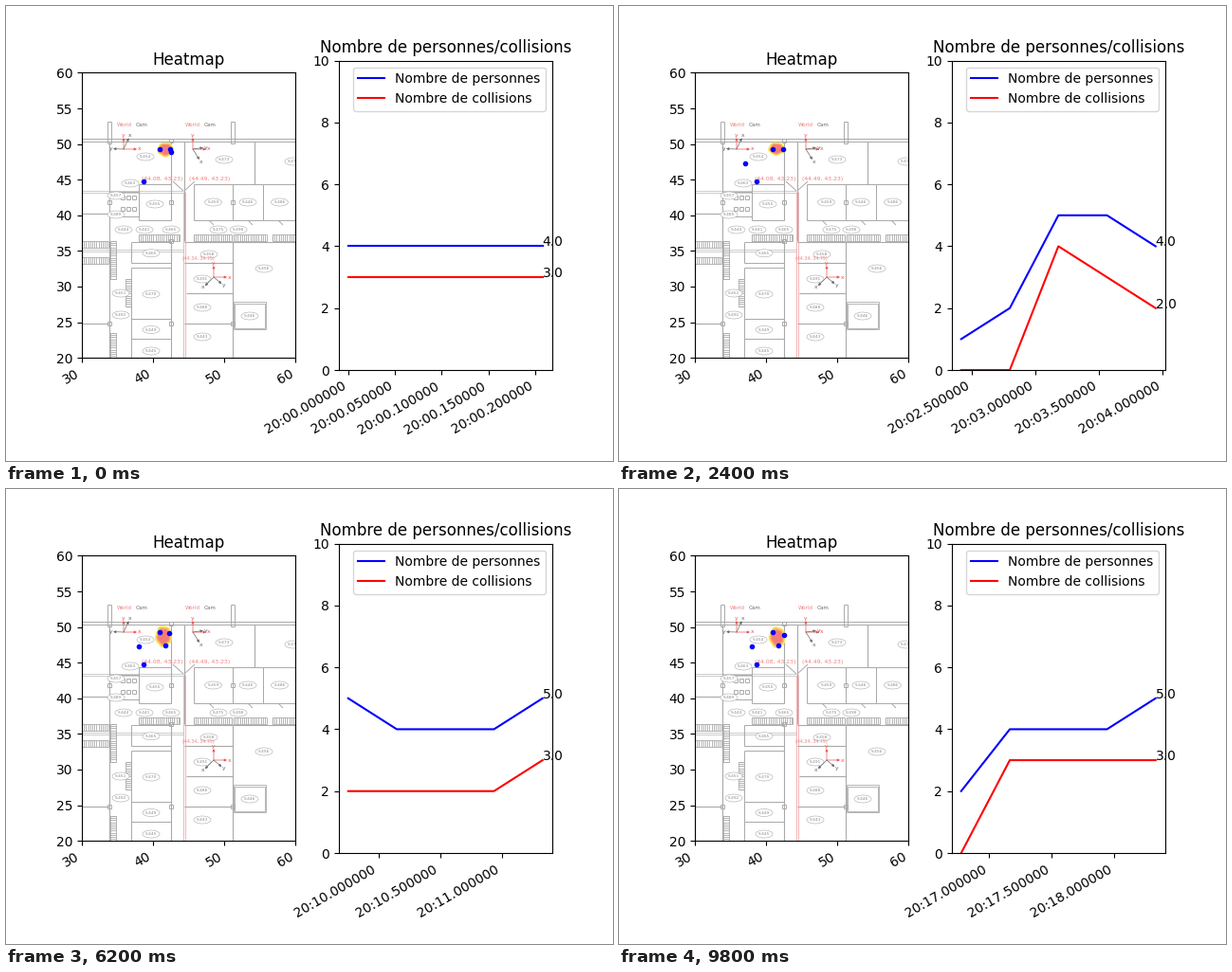
These frames come from a looping animation (640x480 px, 10000 ms). A matplotlib script:

```python
import random

import numpy as np
import matplotlib.pyplot as plt
from matplotlib.animation import FuncAnimation
from matplotlib.collections import LineCollection
from matplotlib.patches import Ellipse, Polygon

FRAMES, STEP_MS, WINDOW = 50, 200, 5
GRAY, LIGHT, PINK, DARK, RED = "#a9a9a9", "#cccccc", "#f08080", "#6a6a6a", "#ef5350"
SCALE = 7.515  # stage pixels per metre on the plan
random.seed(4)

# Clock in seconds for each sample, between a few key samples.
# Sample k is shown as the newest one in frame k - 1.
times = np.interp(
    np.arange(FRAMES + 1),
    [0, 1, 5, 8, 9, 14, 18, 20, 24, 28, 32, 38, 42, 46, 50],
    [0, .208, 1.34, 2.09, 2.419, 4.325, 5.895, 6.687, 8.209, 9.756,
     11.33, 13.615, 15.2, 16.78, 18.33])

# Visits: x, y on the stage, first and last frame present.
CLOSE = [(161.7, 151.2, -1, 6), (161.7, 151.2, 9, 49),
         (172.5, 151.5, -1, 6), (172.5, 151.5, 10, 12), (172.5, 151.5, 15, 18),
         (172, 151.8, 20, 44), (174, 154.5, 46, 49),
         (173.5, 154, -1, 6), (167.5, 165.5, 10, 11), (167.5, 165.5, 23, 26),
         (167.5, 165.5, 31, 43), (167.5, 165.5, 46, 49),
         (168, 134, 2, 3), (168, 134, 10, 10), (168, 134, 24, 24),
         (168, 134, 37, 40)]
APART = [(144.6, 185.3, -1, 49), (138, 166.5, 4, 6), (133, 166.5, 11, 12),
         (140.5, 156.5, 19, 27), (139.5, 166.5, 20, 22),
         (139.5, 166.5, 27, 33), (139.5, 166.5, 49, 49)]


def present(visits, i):
    return [(x, y) for x, y, first, last in visits if first <= i <= last]


def count(i):
    """Number of people, and how many of them stand too close."""
    close = len(present(CLOSE, i))
    return close + len(present(APART, i)), close if close > 1 else 0


counts = np.array([count(i) for i in range(-1, FRAMES)])


def to_plan(pts):
    """Stage pixels to plan metres."""
    p = np.asarray(pts, float)
    return np.column_stack([30 + (p[:, 0] - 80) / SCALE,
                            60 - (p[:, 1] - 70.5) / SCALE])


fig, (plan, chart) = plt.subplots(1, 2, figsize=(6.4, 4.8), dpi=100)
fig.subplots_adjust(bottom=0.2)


def lines(segs, color=GRAY, width=0.7):
    plan.add_collection(LineCollection(
        [to_plan([(a, b), (c, d)]) for a, b, c, d in segs],
        colors=color, linewidths=width, zorder=1), autolim=False)


def hline(y, x0=80, x1=305, **style):
    lines([(x0, y, x1, y)], **style)


def vline(x, y0, y1, **style):
    lines([(x, y0, x, y1)], **style)


def box(x0, y0, x1, y1, width=0.7):
    lines([(x0, y0, x1, y0), (x1, y0, x1, y1),
           (x1, y1, x0, y1), (x0, y1, x0, y0)], width=width)


def square(x, y, r=2):
    box(x - r, y - r, x + r, y + r)


def stairs(x0, y0, x1, y1):
    if x1 - x0 > y1 - y0:
        lines([(x, y0, x, y1) for x in np.arange(x0, x1, 2.2)], width=0.6)
    else:
        lines([(x0, y, x1, y) for y in np.arange(y0, y1, 2.2)], width=0.6)
    box(x0, y0, x1, y1, 0.6)


def label(x, y, text, color=DARK, size=4.1):
    (u, v), = to_plan([(x, y)])
    plan.text(u, v, text, color=color, fontsize=size, ha="center",
              va="center", clip_on=True, zorder=2)


def room(x, y):
    (u, v), = to_plan([(x, y)])
    plan.add_patch(Ellipse((u, v), 18 / SCALE, 8 / SCALE, fc="white",
                           ec=GRAY, lw=0.4, zorder=1.5))
    label(x, y, f"S-{random.randint(440, 499)}", "#888888", 3.1)


def arrow(x, y, angle, length, name, color):
    dx, dy = np.cos(np.radians(angle)), -np.sin(np.radians(angle))
    a, b = to_plan([(x, y), (x + length * dx, y + length * dy)])
    plan.annotate("", b, a, arrowprops=dict(
        arrowstyle="-|>", color=color, lw=0.5, mutation_scale=4,
        shrinkA=0, shrinkB=0), zorder=2)
    label(x + (length + 2.5) * dx, y + (length + 2.5) * dy, name, color, 4.4)


def draw_walls():
    for y in (140.3, 143):
        hline(y)
    for y in (195.2, 196.6, 257, 259):
        hline(y, x1=187, color=LIGHT)
    for x in (186.8, 189.2):
        vline(x, 196, 371, color="#f2aaaa", width=0.6)
    for x, y0, y1 in [(109, 143, 196), (109, 219, 371), (174, 143, 226),
                      (174, 248, 371), (187.5, 143, 248), (239, 248, 371),
                      (262, 143, 188)]:
        vline(x, y0, y1, width=0.8)
    for y, x0, x1 in [(219, 80, 109), (335, 80, 109), (248.5, 188, 305),
                      (271, 188, 239), (303, 190, 239), (335, 188, 239)]:
        hline(y, x0, x1, width=0.8)
    for x in (109.3, 238.8):
        box(x - 2, 122, x + 2, 145)
        for y in (207, 335):
            square(x, y)
    for y in (142, 207, 248, 335):
        square(174, y)
    for x in (123, 129, 135):
        for y in (202, 214):
            square(x, y, 1.7)
    lines([(176, 185, 187, 195), (199, 185, 188, 195)])


def draw_rooms():
    box(109, 196, 140, 222)
    box(140, 188.5, 174, 226)
    room(157, 209)
    for x0, x1 in [(198, 239), (239, 271), (271, 306)]:
        box(x0, 188.5, x1, 226)
        room((x0 + x1) / 2, 207)
        lines([(x0 + 16, 226, x0 + 21, 231)])
    for y0, y1 in [(248.5, 271), (276, 330), (330, 351), (351, 375)]:
        box(132, y0, 174, y1)
        room(153, (y0 + y1) / 2 + 1)
    for r in (0, 1.5):
        box(239.5 + r, 312 + r, 274 - r, 341 - r, 0.6)
    for x in (124, 146, 174, 224, 245):
        room(x, 236)
    for y in (262, 288, 318, 349):
        room(207 + 7 * (y == 262), y)
    for x, y in [(147, 159), (230, 162), (303, 164), (131, 187), (116, 200),
                 (116, 220), (121, 303), (121, 326), (257, 327), (272, 277)]:
        room(x, y)


def draw_notes():
    for x0, x1 in [(140, 183), (198, 238), (240, 275), (281, 305)]:
        stairs(x0, 241, x1, 248)
    for y in (248, 265):
        stairs(80, y, 108, y + 7)
    for x, y0, y1 in [(110, 248, 288), (110, 345, 371), (126, 288, 317)]:
        stairs(x, y0, x + 6, y1)
    for x in (125, 197):
        label(x, 125.5, "World", PINK)
        label(x + 18, 125.5, "Cam")
    label(165, 182.5, "(44.08, 43.23)", PINK, 4.4)
    label(215, 182.5, "(44.49, 43.23)", PINK, 4.4)
    label(203, 266.5, "(44.34, 34.75)", PINK, 3.4)
    # camera axes: origin, then headings of x and y
    for x, y, ax, ay in [(124, 151, 65, 178), (197, 151, -58, 8),
                         (219, 286, 225, -40)]:
        arrow(x, y, 0, 14, "x", RED)
        arrow(x, y, 90, 12, "y", RED)
        arrow(x, y, ax, 13, "x", DARK)
        arrow(x, y, ay, 11, "y", DARK)


draw_walls()
draw_rooms()
draw_notes()
plan.set(xlim=(30, 60), ylim=(20, 60), aspect="equal", title="Heatmap",
         yticks=range(20, 61, 5))
plan.set_xticks([30, 40, 50, 60], ["30", "40", "50", "60"],
                rotation=30, ha="right")
rings = [plan.add_patch(Polygon([(0, 0), (1, 0), (0, 1)], lw=0, zorder=3))
         for _ in range(4)]
dots, = plan.plot([], [], "bo", ms=3, zorder=4)

chart.set(ylim=(0, 10), yticks=range(0, 11, 2),
          title="Nombre de personnes/collisions")
curves = [chart.plot([], [], color=c, label=name)[0] for c, name in
          (("blue", "Nombre de personnes"), ("red", "Nombre de collisions"))]
tags = [chart.text(0, 0, "") for _ in curves]
chart.legend(loc="upper right")


def set_heat(i, group):
    """Nested warm rings around the people who stand close together."""
    shades = ["#f8ee6a", "#fdc95a", "#f99a68", "#f47c78"]
    if i % 3 == 2:
        shades = ["#8ccb6e", "#e6e066", "#fbaa66", "#f47c78"]
    th = np.linspace(0, 2 * np.pi, 60)
    for j, (ring, shade) in enumerate(zip(rings, shades)):
        ring.set_visible(len(group) > 1)
        if len(group) > 1:
            cx, cy = np.mean(group, axis=0) - (1, 0.7)
            ry = 7 + 0.7 * np.std(group, axis=0)[1]
            r = (1 - 0.12 * j) * (1 + 0.05 * np.sin(5 * th + i))
            ring.set_xy(to_plan(np.column_stack(
                [cx + 8.8 * r * np.cos(th), cy + ry * r * np.sin(th)])))
            ring.set_facecolor(shade)


def set_ticks(t0, t1):
    step = next(s for s in (.05, .1, .2, .5, 1) if t1 - t0 <= 7 * s)
    ticks = step * np.arange(np.ceil(t0 / step), np.floor(t1 / step) + 1)
    chart.set_xlim(t0, t1)
    chart.set_xticks(ticks, [f"20:{abs(t):09.6f}" for t in ticks],
                     rotation=30, ha="right")


def update(i):
    last = i + 1
    win = slice(max(0, last - WINDOW + 1), last + 1)
    t = times[win]
    for curve, tag, data in zip(curves, tags, counts.T):
        curve.set_data(t, data[win])
        tag.set_position((t[-1], data[last]))
        tag.set_text(f"{data[last]:.1f}")
    pad = 0.05 * (t[-1] - t[0])
    set_ticks(t[0] - pad, t[-1] + pad)
    group = present(CLOSE, i)
    set_heat(i, group)
    dots.set_data(*to_plan(group + present(APART, i)).T)
    return [*curves, *tags, *rings, dots]


anim = FuncAnimation(fig, update, frames=FRAMES, interval=STEP_MS,
                     init_func=lambda: update(0), repeat=True,
                     repeat_delay=0, blit=False)
plt.show()
```
